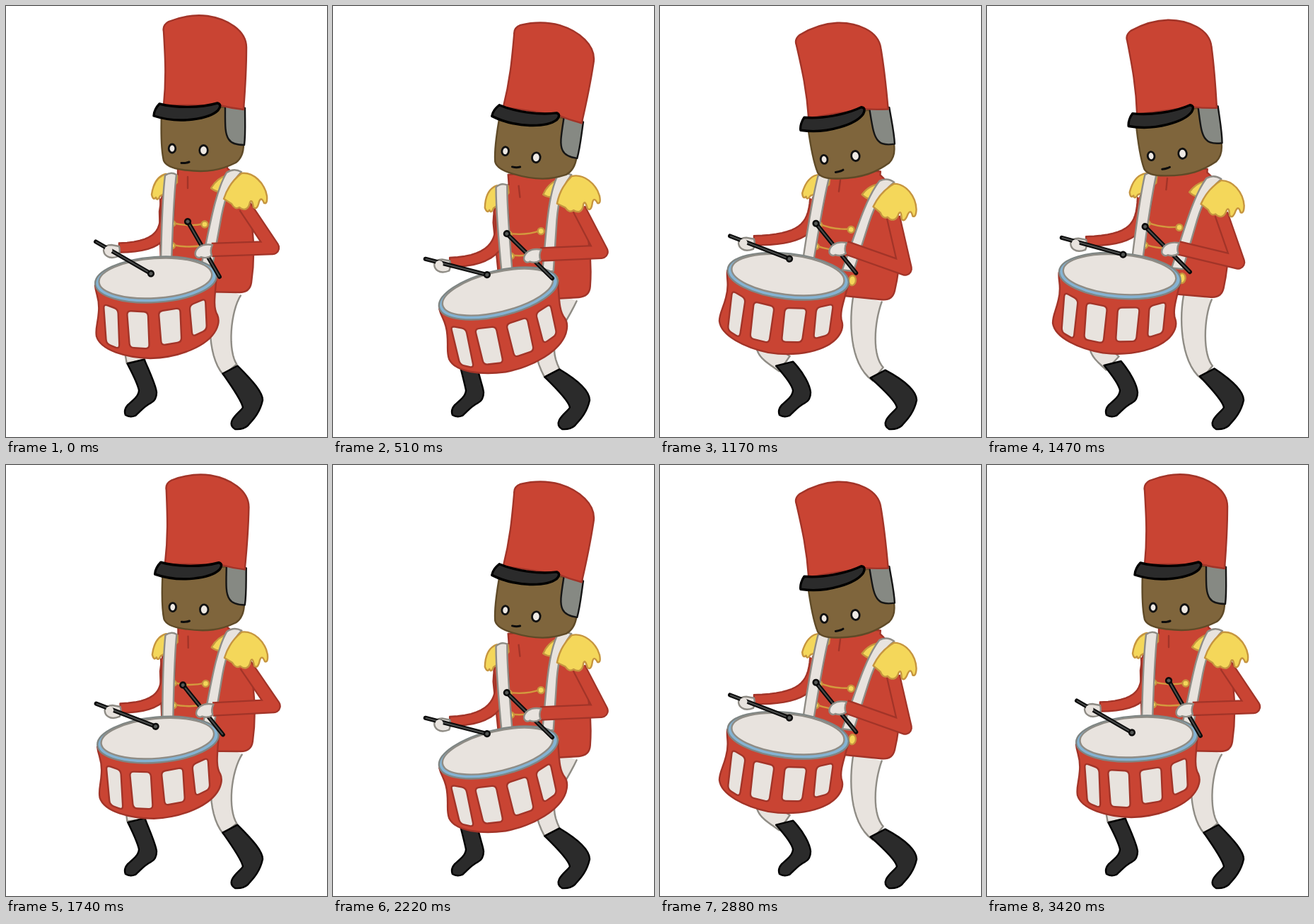
An HTML page for the animation above (3450 ms loop, 454 px wide and 608 px high).

```html
<!DOCTYPE html>
<html lang="en">
<head>
<meta charset="utf-8">
<title>Marching drummer</title>
<style>
  html, body { margin: 0; width: 100%; height: 100%; overflow: hidden; background: #fff; }
  svg { display: block; width: 454px; height: 608px; }
  path, ellipse, circle { stroke-width: 2.4; stroke-linejoin: round; stroke-linecap: round; }
  .red { fill: #c94433; stroke: #a23428; }
  .white { fill: #e8e3de; stroke: #8f8c85; }
  .gold { fill: #f4d75a; stroke: #c6953f; }
  .panel { fill: #e8e3de; stroke: #a23428; }
  .black { fill: #2b2b2b; stroke: #000; }
  .skin { fill: #7f653c; stroke: #5f4a27; }
  .hair { fill: #868983; stroke: #151515; }
  .eye { fill: #eee9e4; stroke: #111; stroke-width: 2.8; }
  .rim { fill: #84b3d3; stroke: #7f8684; }
  .cord { fill: none; stroke: #d39a3e; }
  .line { fill: none; stroke: #a23428; }
  .mouth { fill: none; stroke: #0c0c0c; stroke-width: 3; }
  .brim { stroke-width: 3.4; }
  .sleeve { fill: none; stroke: #a23428; stroke-width: 20.5; stroke-linecap: butt; }
  .sleeve.inner { stroke: #c94433; stroke-width: 16; }
  .stick { fill: none; stroke: #0c0c0c; stroke-width: 6; }
  .core { fill: none; stroke: #4a4c4b; stroke-width: 2; }
  .knob { fill: #555856; stroke: #0c0c0c; stroke-width: 2.6; }
</style>
</head>
<body>
<svg viewBox="0 0 454 608">
  <defs>
    <g id="beater">
      <path class="stick" d="M-15 0H73"/>
      <path class="core" d="M-14 0H72"/>
      <circle class="knob" cx="75" r="3.8"/>
    </g>
  </defs>

  <path id="legL" class="white"/>
  <path id="bootL" class="black"/>
  <path id="legR" class="white"/>
  <path id="bootR" class="black"/>

  <g data-part="jacket">
    <path class="red" d="M243 224H313V229Q335 245 341 278C350 305 353 350 347 390Q345 404 330 404L220 402L217 290Q222 245 243 238Z"/>
  </g>
  <path id="armL" class="red"/>
  <g data-part="torso">
    <path class="line" d="M257 241V257"/>
    <path class="cord" d="M236 306Q258 312 281 307M236 337Q258 342 283 337"/>
    <circle class="gold" cx="236" cy="307" r="3.5"/>
    <circle class="gold" cx="281" cy="308" r="4.5"/>
    <circle class="gold" cx="235" cy="338" r="4"/>
    <ellipse class="gold" cx="292" cy="379" rx="5" ry="7"/>
    <path class="gold" d="M226 237C214 240 208 252 206 266Q208 275 212 270Q214 276 218 268L229 262L242 249V239Z"/>
    <path class="white" d="M225 239Q233 233 241 238C237 268 236 310 234 362H219C220 310 221 270 225 239Z"/>
    <path class="gold" d="M290 257Q298 243 312 239L303 262Q296 262 290 257Z"/>
    <path class="white" d="M312 235Q322 228 333 234C317 250 310 270 305 295L292 366H276C286 325 294 265 312 235Z"/>
  </g>

  <g data-part="head">
    <path class="skin" d="M220 150C219 180 220 205 223 218Q227 228 250 231C285 236 305 231 325 221Q336 213 336 195V140Z"/>
    <path class="hair" d="M310 138C310 165 309 180 315 188Q320 196 337 196C339 180 338 165 338 144Z"/>
    <path class="red" d="M223 36Q221 27 230 22C250 14 268 12 285 14C312 18 341 34 340 60C340 90 338 120 336 146Q318 144 302 140H223C227 100 225 70 223 36Z"/>
    <path class="black brim" d="M209 155C209 149 213 142 217 138C240 144 275 144 299 137Q306 139 300 147C288 159 246 167 209 155Z"/>
    <ellipse class="eye" cx="235" cy="201" rx="4.8" ry="6"/>
    <ellipse class="eye" cx="279.500" cy="203.500" rx="5.800" ry="7"/>
    <path class="mouth" d="M248 221.500Q254 222 259 220"/>
  </g>

  <g data-part="drum">
    <path class="red" d="M126 394C127 408 133 412 131 432C130 448 126 455 128 466C134 486 170 496 204 497C245 496 285 480 297 457Q303 445 299 436C292 425 296 405 298 380Z"/>
    <g id="panels"></g>
    <g transform="rotate(-4 212 386)">
      <ellipse class="rim" cx="212" cy="386" rx="86" ry="32"/>
      <ellipse class="white" cx="211.500" cy="384" rx="80" ry="28"/>
    </g>
  </g>

  <path class="sleeve" data-sleeve/>
  <path class="sleeve inner" data-sleeve/>
  <g data-part="torso">
    <path class="gold" d="M333 236C350 234 366 250 369 268Q370 280 365 278Q361 268 358 276Q355 289 350 284Q348 271 345 277C343 288 336 289 330 284Q324 288 319 279L308 272Q315 250 333 236Z"/>
  </g>

  <g data-part="handL">
    <g transform="translate(149 346)">
      <path class="white" d="M-11 -2Q-9 -9 0 -9L11 -7Q13 0 10 7Q0 11 -6 7Q-11 4 -11 -2Z"/>
      <g transform="translate(-9 -6)"><use id="stickL" href="#beater"/></g>
      <ellipse cx="-4" cy="-2" rx="5.500" ry="5.500" fill="#e8e3de"/>
    </g>
  </g>
  <g data-part="handR">
    <g transform="translate(280 346)">
      <g transform="translate(9 13.5)"><use id="stickR" href="#beater"/></g>
      <path class="white" d="M12 -9Q0 -11 -7 -6Q-14 0 -12 6Q-9 11 -4 8Q4 11 11 6Q8 -1 12 -9Z"/>
    </g>
  </g>
</svg>

<script>
const LOOP = 3450, SWAY = 1710, STEP = 30, BEATS = 12;
const LEAD = Math.PI / 60, REACH = 0.936;

// sway moves a part side to side, drop pulls it at both ends, tilt turns it.
const parts = {
  head: { pivot: [253, 221], sway: [3, -2], drop: [3, 9], tilt: 9 },
  torso: { pivot: [257, 249], sway: [5, 5], drop: [2, 9], tilt: -7 },
  jacket: { pivot: [257, 249], sway: [5, 5], drop: [2, 9], tilt: -4.5 },
  drum: { pivot: [212, 386], sway: [26, 13], drop: [-3, 8], tilt: -10 },
  handL: { pivot: [149, 346], sway: [15, 16], drop: [-10, 6], tilt: 0 },
  handR: { pivot: [280, 346], sway: [14, 5], drop: [-12, 2], tilt: 0 },
  elbow: { pivot: [377, 341], sway: [15, -10], drop: [-13, 17], tilt: 0 },
  hip: { pivot: [316, 400], sway: [18, 0], drop: [-3, 11], tilt: 0 }
};

const $ = q => document.querySelector(q);
const add = ([x, y], dx, dy) => [x + dx, y + dy];
const text = p => p.map(n => n.toFixed(2)).join(' ');
const line = pts => 'M' + pts.map(text).join('L');
const between = (a, b, k) => a.map((n, i) => n + (b[i] - n) * k);

function shift({ sway, drop }, s) {
  return sway.map((n, i) => n * s + drop[i] * s * s);
}

// Where a point fixed to a part has gone.
function carry(part, [x, y], s) {
  const { pivot: [px, py], tilt } = part;
  const a = tilt * s * Math.PI / 180, c = Math.cos(a), d = Math.sin(a);
  const [dx, dy] = shift(part, s);
  return [px + dx + (x - px) * c - (y - py) * d, py + dy + (x - px) * d + (y - py) * c];
}

const joint = (name, s) => add(parts[name].pivot, ...shift(parts[name], s));

// A tapering tube along a cubic curve.
function limb(a, b, c, d, wide, thin) {
  const left = [], right = [], n = 16;
  for (let i = 0; i <= n; i++) {
    const k = i / n;
    const p = between(between(a, b, k), between(b, c, k), k);
    const q = between(between(b, c, k), between(c, d, k), k);
    const [x, y] = between(p, q, k);
    const angle = Math.atan2(q[1] - p[1], q[0] - p[0]);
    const r = (wide + (thin - wide) * k) / 2;
    const nx = Math.sin(angle) * r, ny = -Math.cos(angle) * r;
    left.push([x + nx, y + ny]);
    right.unshift([x - nx, y - ny]);
  }
  return line([...left, ...right]);
}

function rounded(pts, r) {
  return pts.map((p, i) => {
    const toward = q => between(p, q, r / Math.hypot(q[0] - p[0], q[1] - p[1]));
    const before = toward(pts.at(i - 1)), after = toward(pts[(i + 1) % pts.length]);
    return `${i ? 'L' : 'M'}${text(before)}Q${text(p)} ${text(after)}`;
  }).join('') + 'Z';
}

// Windows spaced evenly around the drum shell.
function panel(i) {
  const tall = 56 - 4 * i;
  const edge = deg => {
    const a = deg * Math.PI / 180;
    return [212 + 86 * Math.cos(a), 399 + 32 * Math.sin(a) - 6 * Math.cos(a)];
  };
  const a = edge(149.5 - 31 * i), b = edge(128.5 - 31 * i);
  const shape = rounded([a, b, add(b, 2, tall), add(a, 4, tall)], 6);
  return `<path class="panel" d="${shape}"/>`;
}
$('#panels').innerHTML = [0, 1, 2, 3].map(panel).join('');

function drawLegs(s) {
  const drop = s * s;
  const hip = joint('hip', s);
  const ankleR = [317 - 8 * drop, 513 + 5.5 * drop];
  const kneeR = add(hip, -15 - 6 * s, 28 + 8 * s + 12 * drop);
  const shinR = [298 - 13 * drop, 490 - 14 * s - 5 * drop];
  $('#legR').setAttribute('d', limb(hip, kneeR, shinR, ankleR, 36 - 5 * s, 24));
  $('#bootR').setAttribute('d', line([add(ankleR, -10.5, 5.5), add(ankleR, 10.5, -5.5)]) +
    'C350 530 363 545 363 556C359 575 348 585 342 592Q335 598 324 597Q316 592 320 584C325 575 334 570 335 566Q333 556 ' +
    text(add(ankleR, -10.5, 5.5)) + 'Z');

  const ankleL = [183.5 + 7 * s, 501.5 - 3 * s];
  const topL = [180 + 15 * s - 14 * drop, 470];
  const calfL = add(topL, 1, 16);
  $('#legL').setAttribute('d', limb(topL, calfL, calfL, ankleL, 27, 26));
  $('#bootL').setAttribute('d', line([add(ankleL, -12, 3), add(ankleL, 12, -3)]) +
    'C204 518 212 535 213 545Q213 556 205 560C195 565 190 572 183 578Q175 581 169 577Q166 570 172 563C180 556 188 550 188 542Q186 532 ' +
    text(add(ankleL, -12, 3)) + 'Z');
}

function drawArms(s) {
  const shoulder = carry(parts.torso, [228, 272], s);
  const wrist = add(joint('handL', s), 11, -5);
  $('#armL').setAttribute('d',
    limb(shoulder, add(shoulder, 2 + 6 * s, 43), add(wrist, 65, -1), wrist, 20, 13));

  const bend = line([
    carry(parts.torso, [338, 283], s), joint('elbow', s), add(joint('handR', s), 11, -2)
  ]);
  document.querySelectorAll('[data-sleeve]').forEach(p => p.setAttribute('d', bend));
}

function draw(time) {
  const turn = Math.floor(time % LOOP / STEP) * STEP % SWAY / SWAY * 2 * Math.PI;
  const s = (Math.sin(turn + LEAD) - Math.sin(LEAD)) / REACH;

  document.querySelectorAll('[data-part]').forEach(g => {
    const part = parts[g.dataset.part];
    g.setAttribute('transform',
      `translate(${shift(part, s)}) rotate(${part.tilt * s} ${part.pivot})`);
  });
  drawLegs(s);
  drawArms(s);

  const beat = 21.1 + 9.2 * Math.cos(BEATS * turn + Math.PI / 12);
  $('#stickL').setAttribute('transform', `rotate(${beat})`);
  $('#stickR').setAttribute('transform', `rotate(${beat + 210}) translate(-11 0)`);
}

const begin = performance.now();
function tick() {
  draw(performance.now() - begin);
  requestAnimationFrame(tick);
}
tick();
</script>
</body>
</html>
```
